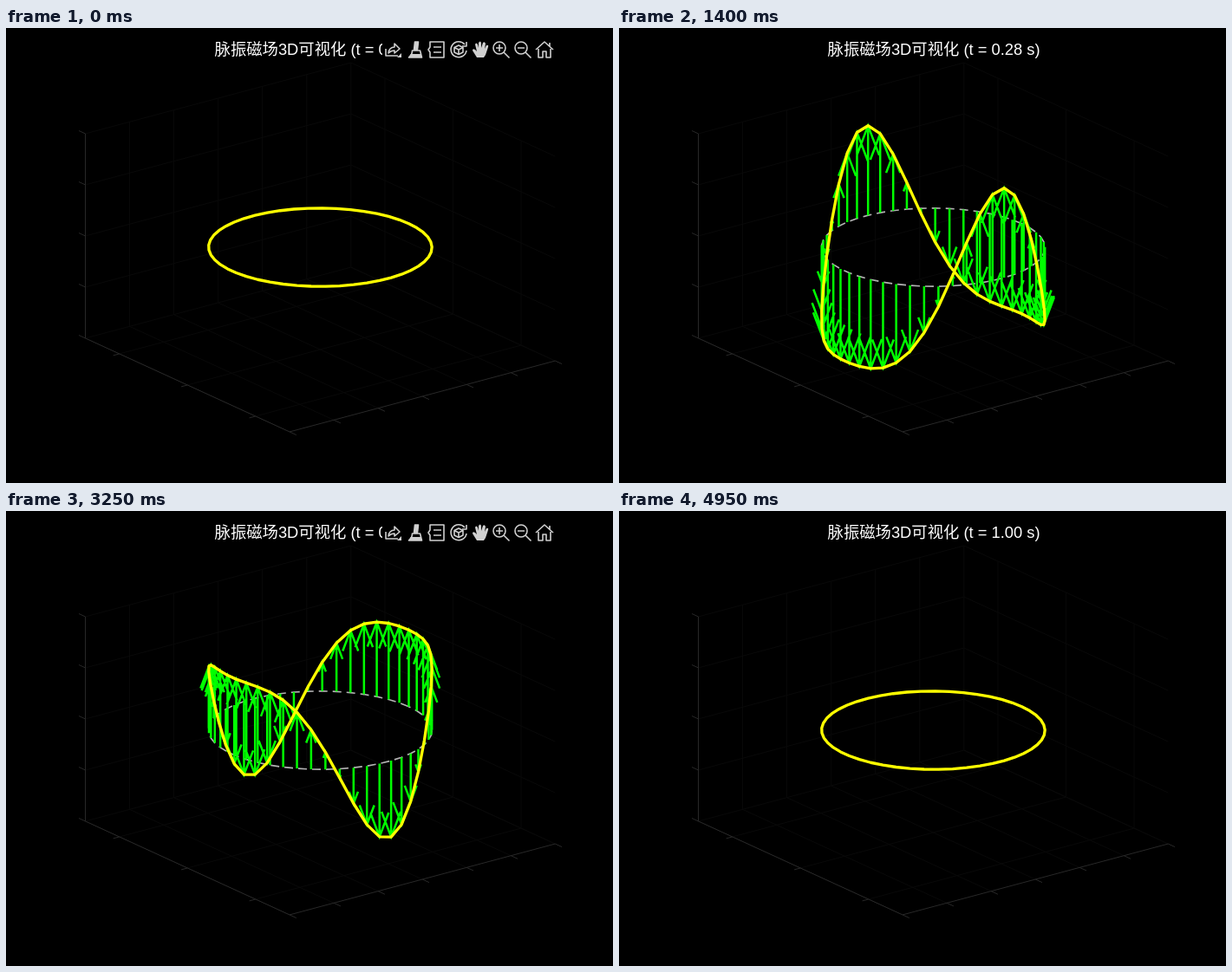
Recreate the animation shown at these times as an HTML page. Size 700x525 px, loop 5000 ms.

```html
<!DOCTYPE html>
<html lang="zh">
<head>
<meta charset="utf-8">
<style>
  html, body { margin: 0; width: 100%; height: 100%; overflow: hidden; background: #000; }
  svg { display: block; width: 700px; height: 525px; }
  path { fill: none; }
  #grid { stroke: #090909; }
  #axes { stroke: #282828; }
  #base { stroke: #b3b3b3; stroke-width: 1.67; stroke-dasharray: 10 6; }
  #arrows { stroke: #0f0; stroke-width: 2.5; }
  #wave { stroke: #ff0; stroke-width: 3.33; stroke-linejoin: round; }
  #title { fill: #fff; font: 300 18.33px "Liberation Sans", "Noto Sans CJK SC", "Noto Sans CJK", sans-serif; white-space: pre; }
  #tools path, #tools circle, #tools rect { fill: none; stroke: #d0d0d0; stroke-width: 1.6; stroke-linejoin: round; }
  #tools .solid { fill: #d0d0d0; stroke: none; }
  #tools .back { fill: #000; stroke: none; }
</style>
</head>
<body>
<svg viewBox="0 0 700 525">
  <path id="grid"/>
  <path id="axes"/>
  <path id="base"/>
  <path id="arrows"/>
  <path id="wave"/>
  <text id="title" x="240.6" y="31"></text>
  <g id="tools">
    <rect class="back" x="434" y="13" width="202" height="25"/>
    <g transform="translate(446 25)">
      <path d="M-8 -1V7H6M-5 4Q-4 -3 2 -3V-7L8 -1L2 4V1Q-2 1 -5 4Z"/>
      <path class="solid" d="M10 4V9H5Z"/>
    </g>
    <g transform="translate(472.5 25)">
      <path d="M-1 -9H3L2 0H-2ZM-4 1H5L7 9H-8Q-4 6 -4 1Z"/>
      <path class="solid" d="M-1 -9H3L2 1H-2ZM-6 5H6L7 9H-8Z"/>
    </g>
    <g transform="translate(497 25)">
      <path d="M-8 -9H8V9H-8V3L-10 0L-8 -3ZM-4 -3H5M-4 3H5"/>
    </g>
    <g transform="translate(522 25)">
      <path d="M7 -6A9 9 0 1 0 9 1M9 -9V-4H4" stroke-width="2"/>
      <path d="M0 -5L5 -2.5V3L0 5.5L-5 3V-2.5ZM-5 -2.5L0 0L5 -2.5M0 0V5.5"/>
    </g>
    <g transform="translate(547 25)">
      <path class="solid" d="M-4 9L-9 1Q-9 -2 -6 0L-4 2L-6 -6Q-5 -9 -3 -6L-2 -2V-8Q0 -11 1 -8V-2L3 -8Q5 -10 6 -7L5 -1L7 -5Q10 -6 9 -3L6 6L4 9Z"/>
    </g>
    <g transform="translate(571 25)">
      <circle cx="-2" cy="-2" r="7"/>
      <path d="M3 3L9.500 9.500M-6 -2H2M-2 -6V2"/>
    </g>
    <g transform="translate(596 25)">
      <circle cx="-2" cy="-2" r="7"/>
      <path d="M3 3L9.500 9.500M-6 -2H2"/>
    </g>
    <g transform="translate(621 25)">
      <path d="M-10 0L0 -9L10 0M-7 -1V9H-2V2H2V9H7V-1M6 -4V-8"/>
    </g>
  </g>
</svg>
<script>
const STEP = 50, STEPS = 100, SEGMENTS = 49, AMP = 0.9;
const TOOLS = [[0, 1400], [3050, 3600]];
const el = id => document.getElementById(id);

// Box coordinates (x, y in ±1.5, z in ±1) to stage pixels
const project = (x, y, z) => [
  362.4 + 102.1 * x - 78.5 * y,
  253 - 27.3 * x - 36 * y - 118 * z
];
const pt = p => p[0].toFixed(2) + ' ' + p[1].toFixed(2);
const seg = (a, b) => `M${pt(project(...a))}L${pt(project(...b))}`;
const poly = pts => 'M' + pts.map(pt).join('L') + 'Z';

function drawBox() {
  const L = 1.5;
  let grid = '';
  let axes = seg([-L, L, -1], [-L, L, 1]) + seg([-L, -L, -1], [L, -L, -1]) + seg([-L, -L, -1], [-L, L, -1]);
  for (let x = -L; x <= L; x += 0.5) {
    grid += seg([x, -L, -1], [x, L, -1]) + seg([x, L, -1], [x, L, 1]);
    axes += seg([x, -L, -1], [x, -L - 0.1, -1]);
  }
  for (let y = -1; y <= 1; y++) {
    grid += seg([-L, y, -1], [L, y, -1]) + seg([L, y, -1], [L, y, 1]);
    axes += seg([-L, y, -1], [-L - 0.07, y, -1]);
  }
  for (let z = -1; z <= 1; z += 0.5) {
    grid += seg([-L, L, z], [L, L, z]) + seg([L, -L, z], [L, L, z]);
    axes += seg([-L, L, z], [-L, L + 0.095, z]);
  }
  el('grid').setAttribute('d', grid);
  el('axes').setAttribute('d', axes);
}

const ring = Array.from({ length: SEGMENTS }, (_, i) => {
  const a = 2 * Math.PI * i / SEGMENTS;
  return [Math.cos(a), Math.sin(a)];
});

function arrow([x, y], [, tip]) {
  const len = y - tip;
  if (Math.abs(len) < 0.3) return '';
  const side = 0.125 * len, tail = tip + 0.33 * len;
  return `M${pt([x, y])}L${pt([x, tip])}M${pt([x - side, tail])}L${pt([x, tip])}L${pt([x + side, tail])}`;
}

function render(step) {
  const t = step / (STEPS - 1), ms = step * STEP;
  const swing = AMP * Math.sin(2 * Math.PI * t);
  const feet = ring.map(([x, y]) => project(x, y, 0));
  const tips = ring.map(([x, y]) => project(x, y, swing * Math.cos(Math.PI * x)));
  el('arrows').setAttribute('d', feet.map((p, i) => arrow(p, tips[i])).join(''));
  el('wave').setAttribute('d', poly(tips));
  el('title').textContent = `脉振磁场3D可视化 (t = ${t.toFixed(2)} s)`;
  const shown = TOOLS.some(([from, to]) => ms >= from && ms < to);
  el('tools').setAttribute('visibility', shown ? 'visible' : 'hidden');
}

drawBox();
el('base').setAttribute('d', poly(ring.map(([x, y]) => project(x, y, 0))));

const start = performance.now();
let last = -1;
function tick() {
  const step = Math.floor((performance.now() - start) / STEP) % STEPS;
  if (step !== last) render(last = step);
  requestAnimationFrame(tick);
}
tick();
</script>
</body>
</html>
```
